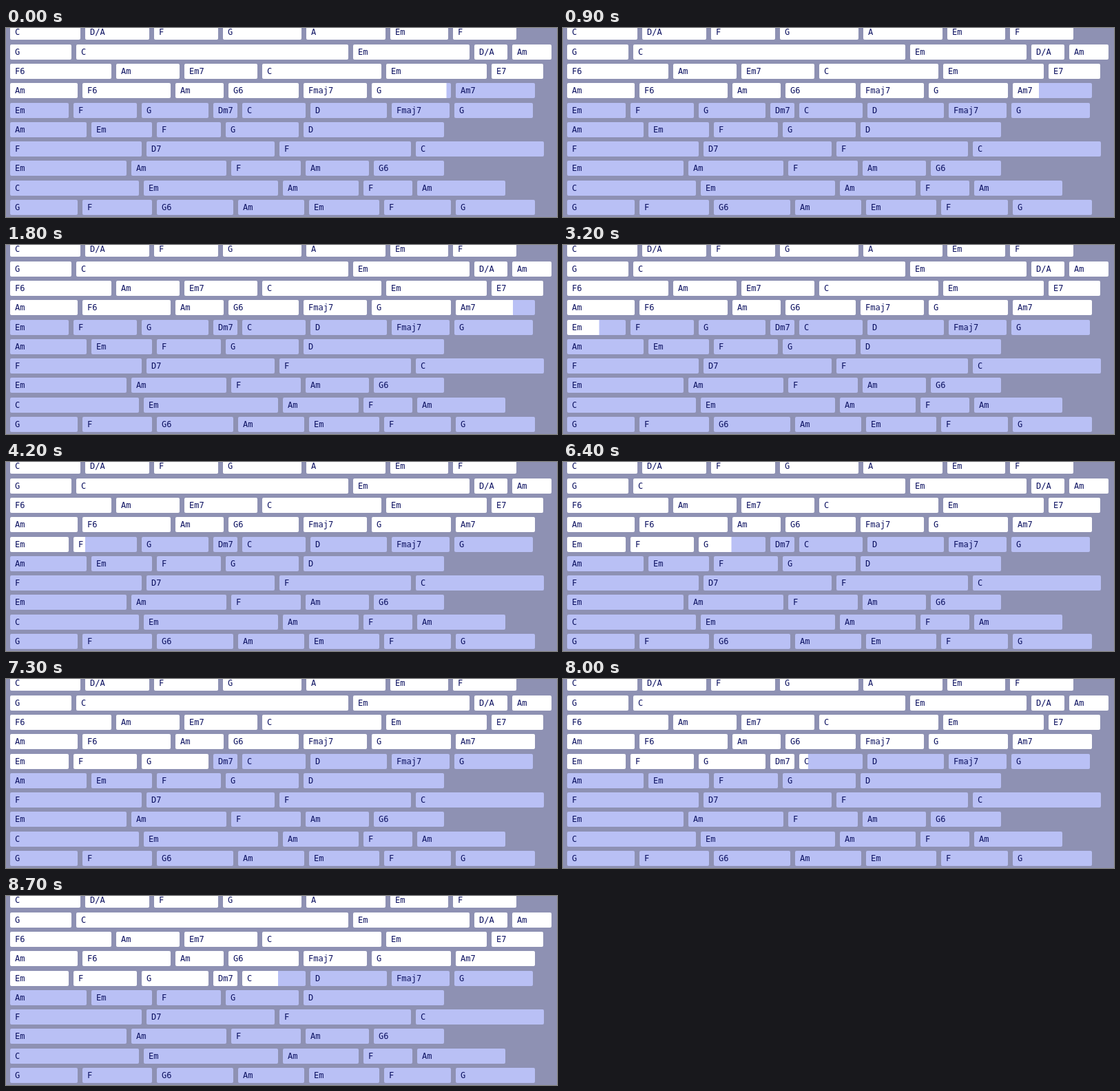
Animation of 800x275 px, one loop 8.8 s. Source, as an HTML page:

```html
<!DOCTYPE html>
<html lang="en">
<head>
<meta charset="utf-8">
<title>Chord progress</title>
<style>
  html, body { margin: 0; width: 100%; height: 100%; overflow: hidden; }
  #stage {
    position: relative; width: 800px; height: 275px; overflow: hidden;
    background: #8e91b3;
  }
  .chord {
    position: absolute; box-sizing: border-box; height: 22px; padding-left: 7px;
    border-radius: 2px; color: #0b1060; white-space: pre;
    font: 12px/22px "DejaVu Sans Mono", monospace;
    background: linear-gradient(#fff, #fff) 0 0 / 0 100% no-repeat #b9c0f5;
  }
</style>
</head>
<body>
<div id="stage"></div>
<script>
const LOOP = 8800, STEP = 100;
const GAP = 6.5, ROW_TOP = -4.7, ROW_PITCH = 28.3;

// Each row: chord name and right edge of its bar
const rows = [
  "C 108 D/A 208 F 308 G 429 A 551 Em 642 F 741",
  "G 95 C 497 Em 673 D/A 728 Am 792",
  "F6 153 Am 252 Em7 365 C 545 Em 698 E7 780",
  "Am 104 F6 239 Am 316 G6 425 Fmaj7 524 G 646 Am7 768",
  "Em 91 F 190 G 294 Dm7 336 C 435 D 553 Fmaj7 644 G 765",
  "Am 117 Em 212 F 312 G 425 D 636",
  "F 197 D7 390 F 588 C 781",
  "Em 175 Am 320 F 428 Am 527 G6 636",
  "C 193 Em 395 Am 512 F 590 Am 725",
  "G 104 F 212 G6 330 Am 433 Em 542 F 646 G 768"
];

// Time in ms, chord index, filled width within that chord
const keys = [
  [0, 23, 108.5], [1800, 24, 83], [3200, 25, 46.5], [4200, 26, 17],
  [5600, 27, 3.5], [7300, 28, 0], [7770, 29, 0], [8700, 29, 52], [8800, 29, 57]
];

const stage = document.getElementById("stage");
const chords = [];
let total = 0;

rows.forEach((row, i) => {
  const parts = row.split(" ");
  let left = 6;
  for (let k = 0; k < parts.length; k += 2) {
    const right = +parts[k + 1];
    const width = right - left;
    const el = document.createElement("div");
    el.className = "chord";
    el.textContent = parts[k];
    el.style.left = left + "px";
    el.style.top = Math.round(ROW_TOP + i * ROW_PITCH) + "px";
    el.style.width = width + "px";
    stage.append(el);
    chords.push({ el, width, start: total });
    total += width;
    left = Math.round(right + GAP);
  }
});

const points = keys.map(([time, index, px]) => [time, chords[index].start + px]);

function headAt(time) {
  const i = points.findIndex(p => p[0] > time);
  const [t0, a] = points[i - 1], [t1, b] = points[i];
  return a + (b - a) * (time - t0) / (t1 - t0);
}

function draw(now) {
  const time = Math.floor((now % LOOP) / STEP) * STEP;
  const head = headAt(time);
  for (const { el, width, start } of chords) {
    const fill = Math.max(0, Math.min(width, head - start));
    el.style.backgroundSize = fill + "px 100%";
  }
}

const begin = performance.now();
function tick() {
  draw(performance.now() - begin);
  requestAnimationFrame(tick);
}
tick();
</script>
</body>
</html>
```
